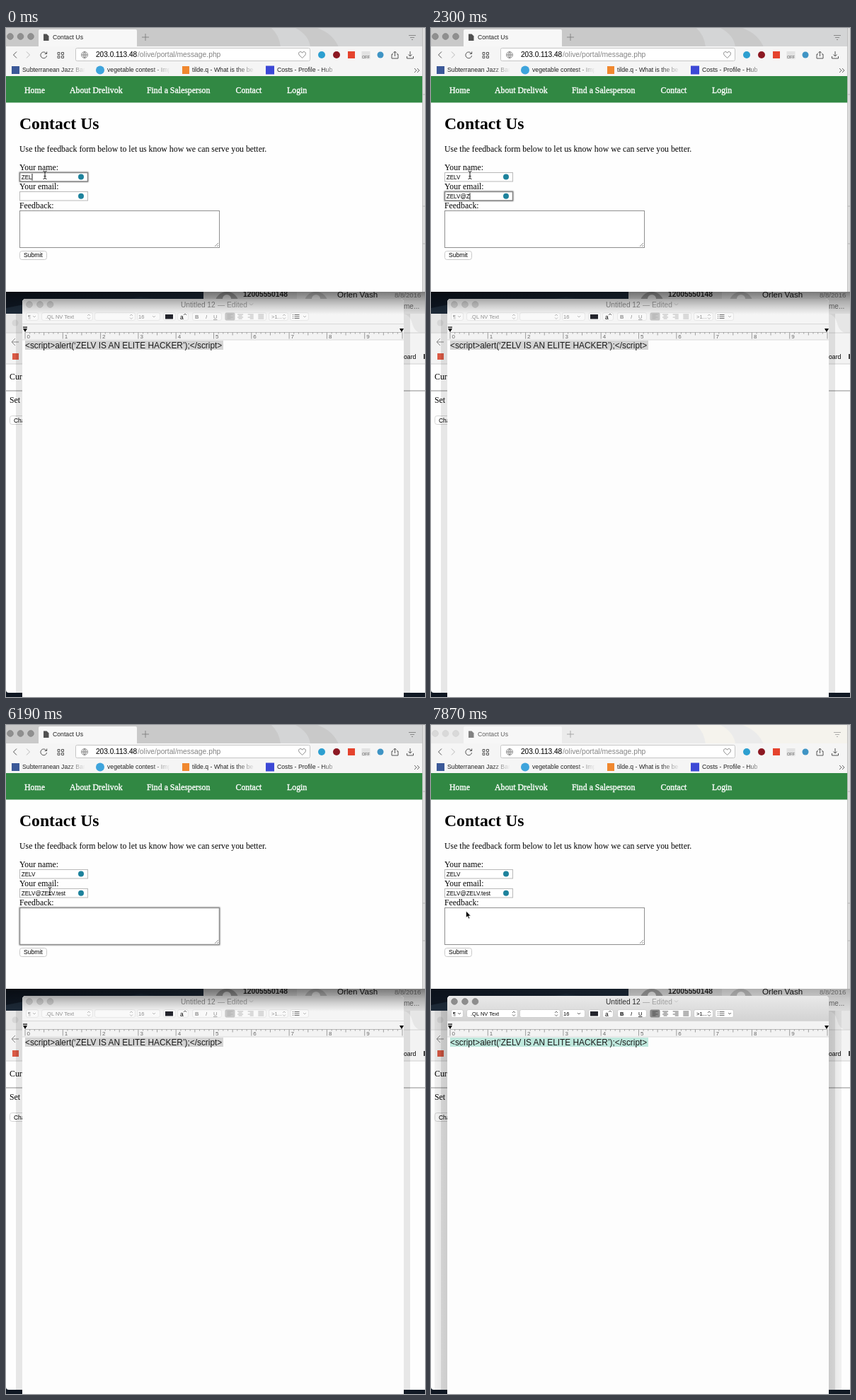
Recreate the animation shown at these times as an HTML page. Size 592x946 px, loop 8 s.

```html
<!DOCTYPE html>
<html lang="en">
<head>
<meta charset="utf-8">
<title>Contact form</title>
<style>
html, body { margin: 0; width: 100%; height: 100%; overflow: hidden; background: #fff; }
svg { display: block; width: 100vw; height: 100vh; font: 8.7px "Liberation Sans", Arial, sans-serif; }
text { white-space: pre; }
.serif { font-family: "Liberation Serif", "Times New Roman", serif; font-size: 11.84px; }
.lato { font-family: Lato, sans-serif; }
.line, .thin { fill: none; stroke: #555; }
.thin { stroke: #777; stroke-width: .8; }
.dark { stroke: #444; }
.mid { stroke: #888; }
.pale { stroke: #b9b9b9; }
.teal { stroke: #0e7f97; }
.field { fill: #fff; stroke: #b9b9b9; }
.field.on { stroke: #858585; stroke-width: 1.5; filter: drop-shadow(0 0 1px #888); }
.typed { font-size: 8.14px; }
.ctl { fill: #fff; stroke: #c9c9c9; stroke-width: .8; }

/* back: browser active, front: editor raised, active: editor focused */
#tabs { fill: #c9c9c9; }
#arcs { fill: #d4d5d6; }
#lights { fill: #8f8f8f; stroke: #7d7d7d; stroke-width: .6; }
#edBar { fill: #f5f5f5; }
#edLights { fill: #d4d4d4; stroke: #c2c2c2; stroke-width: .6; }
#edTitle { fill: #8c8c8c; }
#tools { opacity: .42; }
#sel { fill: #d4d4d4; }
#edShade { opacity: 0; }
.back #edShade { opacity: 1; }
#glow { opacity: 0; }
.active #tabs { fill: #ebebeb; }
.active #arcs { fill: #f5f3ed; }
.active #lights { fill: #d9d9d9; stroke: #cfcfcf; }
.active #tabText { opacity: .7; }
.active #edBar { fill: url(#barGrad); }
.active #edLights { fill: #8d8d8d; stroke: #7c7c7c; }
.active #edTitle { fill: #2c2c2c; }
.active #tools { opacity: 1; }
.active #sel { fill: #bfe8dd; }
.active #glow { opacity: 1; }
.front #drop { opacity: .75; }
.active #drop { opacity: .45; }
</style>
</head>
<body>
<svg id="stage" class="back" viewBox="0 0 592 946" preserveAspectRatio="none">
<defs>
  <linearGradient id="barGrad" x2="0" y2="1"><stop stop-color="#e9e9e9"/><stop offset="1" stop-color="#d3d3d3"/></linearGradient>
  <linearGradient id="down" x2="0" y2="1"><stop stop-opacity=".45"/><stop offset=".45" stop-opacity=".2"/><stop offset="1" stop-opacity="0"/></linearGradient>
  <linearGradient id="shade" x2="0" y2="1"><stop stop-opacity=".32"/><stop offset=".5" stop-opacity=".14"/><stop offset="1" stop-opacity="0"/></linearGradient>
  <linearGradient id="left"><stop stop-opacity=".05"/><stop offset="1" stop-opacity=".12"/></linearGradient>
  <linearGradient id="right"><stop stop-opacity=".12"/><stop offset="1" stop-opacity=".05"/></linearGradient>
  <linearGradient id="fade"><stop stop-color="#f5f5f5" stop-opacity="0"/><stop offset="1" stop-color="#f5f5f5"/></linearGradient>
  <linearGradient id="night"><stop stop-color="#0e1621"/><stop offset=".5" stop-color="#1c2836"/><stop offset="1" stop-color="#101823"/></linearGradient>
</defs>

<!-- desktop -->
<rect width="592" height="946" fill="url(#night)"/>
<path d="M0 396L60 384 120 394 190 380 279 392V404H0Z" fill="#1d2a38"/>

<!-- message list -->
<rect x="279" y="366" width="313" height="40" fill="#dcdcdc"/>
<rect x="279" y="366" width="132" height="17" fill="#cfcfcf"/>
<circle cx="312" cy="390" r="17" fill="#969696"/>
<circle cx="438" cy="390" r="17" fill="#b9b9b9"/>
<circle cx="312" cy="383" r="6" fill="#dedede"/>
<circle cx="438" cy="383" r="6" fill="#e9e9e9"/>
<text x="335" y="380" font-size="10.3" font-weight="bold" fill="#222">12005550148</text>
<text x="468" y="381" font-size="11.6" fill="#111">Orlen Vash</text>
<text x="549" y="381" font-size="9.6" fill="#777">8/8/2016</text>
<text x="562" y="397" font-size="10" fill="#666">me...</text>

<!-- rear browser -->
<path d="M0 404H588Q592 404 592 408V940H4Q0 940 0 936Z" fill="#fefefe"/>
<path d="M0 404H592V431H0Z" fill="#e6e6e6"/>
<path d="M562 404Q571 406 574 418T586 431H562Z" fill="#f4f4f4"/>
<path d="M0 431H592V475H0Z" fill="#f3f3f3"/>
<path d="M0 431H592M0 475H592" stroke="#d0d0d0"/>
<circle cx="13" cy="417" r="4.5" fill="#d6d6d6"/>
<path class="line mid" d="M18 444H8M13 439L8 444 13 449"/>
<rect x="9" y="460" width="9" height="9" fill="#db5a45"/>
<text x="562" y="467.5">oard</text>
<path d="M590 461h2v7h-2z" fill="#444"/>
<g class="serif"><text x="5" y="497">Cur</text><text x="5" y="530">Set</text></g>
<path d="M0 513H592" stroke="#8c8c8c"/>
<rect class="ctl" x="5.5" y="548.5" width="40" height="12" rx="3"/>
<text x="11" y="557.5" font-size="8.4">Cha</text>
<rect id="drop" x="0" y="373" width="592" height="32" fill="url(#down)"/>

<!-- editor shadow -->
<path d="M14 404H23V940H14ZM562 404H571V940H562Z" opacity=".09"/>
<g id="glow">
  <path d="M5 404H23V940H5Z" fill="url(#left)"/>
  <path d="M562 404H580V940H562Z" fill="url(#right)"/>
</g>

<!-- editor -->
<path d="M23 946V388Q23 383 28 383H557Q562 383 562 388V946Z" fill="#fdfdfd"/>
<path id="edBar" d="M23 418V388Q23 383 28 383H557Q562 383 562 388V418Z"/>
<g id="edLights"><circle cx="33" cy="391" r="4.4"/><circle cx="48" cy="391" r="4.4"/><circle cx="62.5" cy="391" r="4.4"/></g>
<g font-size="10.2">
  <text id="edTitle" x="247" y="394.5">Untitled 12</text>
  <text x="299" y="394.5" fill="#a0a0a0">— Edited</text>
</g>
<path class="thin pale" d="M344 389.5l2.5 2.5 2.5-2.5"/>
<g id="tools" font-size="7.5">
  <g id="boxes"></g>
  <text x="31" y="411">¶</text>
  <text x="56" y="410.800">.QL NV Text</text>
  <text x="187" y="410.800">16</text>
  <text x="267" y="411" font-weight="bold">B</text>
  <text x="282" y="411" font-style="italic">I</text>
  <text x="293" y="411" text-decoration="underline">U</text>
  <rect x="309.5" y="402.5" width="14" height="11" rx="2" fill="#8a8a8a"/>
  <path id="aligns" class="thin dark"/>
  <text x="375" y="410.8">&gt;1...</text>
  <path id="steppers" class="thin dark"/>
  <path class="thin dark" d="M38 407l2 2 2-2M207 407l2 2 2-2M420 407l2 2 2-2"/>
</g>
<rect x="225" y="405" width="11" height="6.5" fill="#22232b"/>
<text x="246" y="411.5" font-size="8.5">a</text>
<path class="thin dark" d="M251 406l2-2 2 2M405 405.5h1M407.5 405.5h7M405 408h1M407.5 408h7M405 410.5h1M407.5 410.5h7"/>
<rect x="23" y="418" width="539" height="23" fill="#f3f3f3"/>
<path d="M23 418.5H562M23 441H562" stroke="#d2d2d2" stroke-width=".8"/>
<path d="M27 430.5H560" stroke="#a9a9a9" stroke-width=".8"/>
<path id="ticks" class="thin mid"/>
<g id="inches" font-size="8" fill="#666"></g>
<path d="M24 425h6l-3 5zM24 422.5h6v1.3h-6zM556 425h6l-3 5z"/>
<rect id="sel" x="27" y="442" width="280" height="13"/>
<text x="27" y="452.5" font-size="11.85" fill="#1c1c1c">&lt;script&gt;alert(‘ZELV IS AN ELITE HACKER’);&lt;/script&gt;</text>
<path id="edShade" d="M23 405V388Q23 383 28 383H557Q562 383 562 388V405Z" fill="url(#shade)"/>

<!-- browser -->
<rect x="588" width="4" height="373" fill="#dcdcdc"/>
<path d="M589 94h3M589 252h3M589 305h3" stroke="#b5b5b5"/>
<rect width="588.5" height="373" fill="#fefefe"/>
<rect id="tabs" width="588.5" height="27"/>
<path id="arcs" d="M375 0H409Q428 10 430 27H388Q386 10 375 0ZM440 0H588V27H470Q462 8 440 0Z"/>
<g id="lights"><circle cx="6" cy="12" r="4.4"/><circle cx="20.5" cy="12" r="4.4"/><circle cx="35" cy="12" r="4.4"/></g>
<path d="M46 27V4Q46 2 48 2H183Q185 2 185 4V27Z" fill="#f7f7f7"/>
<g id="tabText">
  <path d="M53 8.5h4.5l3 3V18H53z" fill="#505050"/>
  <text x="66" y="16.3" fill="#222">Contact Us</text>
  <path class="thin" d="M192 13h10M197 8v10M569 10.5h10M571 13.5h6M573 16.5h2"/>
</g>
<rect y="26" width="588.5" height="42" fill="#f5f5f5"/>
<path class="line" d="M15 33.5L10.5 38 15 42.5M57 36a4.4 4.4 0 1 0 .6 3.2M57.7 33.5v3h-3"/>
<path class="line pale" d="M29 33.5L33.5 38 29 42.5"/>
<path class="line" d="M73 34.5h3v3h-3zM78.5 34.5h3v3h-3zM73 39.5h3v3h-3zM78.5 39.5h3v3h-3z"/>
<rect x="98.5" y="28.5" width="331" height="18" rx="2" fill="#fff" stroke="#c6c6c6"/>
<path class="thin" d="M106.5 38a4.5 4.5 0 1 0 9 0a4.5 4.5 0 1 0-9 0h9M111 33.5v9M111 33.5q-4.5 4.5 0 9q4.5-4.5 0-9"/>
<text x="127" y="41.3" font-size="10.1" fill="#111" stroke="#111" stroke-width=".12">203.0.113.48</text>
<text x="186" y="41.3" font-size="10.3" fill="#858585">/olive/portal/message.php</text>
<path class="thin" d="M418.5 42.5l-4.5-4.5q-1.5-4 2-4.5 2 0 2.5 1.8 .5-1.8 2.5-1.8 3.5 .5 2 4.5z"/>
<circle cx="446" cy="38" r="5" fill="#2d9fd0"/>
<circle cx="467" cy="38" r="5" fill="#8c1822"/>
<rect x="483" y="33" width="10" height="10" fill="#e5432d"/>
<rect x="502.5" y="33" width="12" height="11" fill="#e2e2e2"/>
<text x="503" y="43" font-size="5.5" fill="#555">OFF</text>
<circle cx="529" cy="38" r="4.5" fill="#3f94c4"/>
<path class="line" d="M547 37h-2v6h9v-6h-2M549.5 40v-7M547 35.5l2.5-2.5 2.5 2.5M566.5 40v3h9v-3M571 33v7M568.5 37.5l2.5 2.5 2.5-2.5"/>
<rect x="8" y="54" width="11" height="11" fill="#3b5998"/>
<circle cx="133" cy="59.5" r="6" fill="#3ea4dc"/>
<rect x="249" y="54" width="10" height="11" fill="#f0882f"/>
<rect x="367" y="53.5" width="12" height="12" fill="#3c48d6"/>
<g id="marks" fill="#222"></g>
<path class="thin dark" d="M577 57l3 3-3 3M581 57l3 3-3 3"/>
<rect y="68" width="588.5" height="37.5" fill="#318843"/>
<path d="M588.5 0V373" stroke="#b8b8b8" stroke-width=".8"/>

<!-- contact page -->
<g class="serif">
  <g fill="#fff" stroke="#fff" stroke-width=".35">
    <text x="26" y="92">Home</text><text x="90" y="92">About Drelivok</text>
    <text x="199" y="92">Find a Salesperson</text><text x="324.5" y="92">Contact</text><text x="397" y="92">Login</text>
  </g>
  <text x="19" y="143" font-size="23.7" font-weight="bold">Contact Us</text>
  <text x="19" y="175.3">Use the feedback form below to let us know how we can serve you better.</text>
  <text x="19" y="200.8">Your name:</text>
  <text x="19" y="228">Your email:</text>
  <text x="19" y="255.3">Feedback:</text>
</g>
<rect class="field" id="nameBox" x="19.5" y="204.5" width="96" height="12.5"/>
<rect class="field" id="mailBox" x="19.5" y="231.5" width="96" height="12.5"/>
<rect class="field" id="noteBox" x="19.5" y="258.5" width="282" height="52" style="stroke:#8f8f8f"/>
<path class="thin" d="M295 309l5-5M298 309l2-2"/>
<circle cx="106" cy="210.5" r="4" fill="#1d829c"/>
<circle cx="106" cy="237.8" r="4" fill="#1d829c"/>
<text class="typed" id="name" x="21.7" y="213.8"/>
<text class="typed" id="mail" x="21.7" y="241"/>
<rect id="caret" width=".9" height="9.5"/>
<rect class="ctl" x="19.5" y="315.5" width="38" height="12" rx="3" style="stroke:#bdbdbd"/>
<text x="25" y="324.3" font-size="8.6">Submit</text>

<!-- suggestion popup -->
<g id="popup" class="lato">
  <rect x="19" y="250" width="222.5" height="79.5" fill="#fff" style="filter:drop-shadow(0 1px 2px #0004)"/>
  <rect x="19" y="250" width="222.5" height="2" fill="#0e7f97"/>
  <text x="31" y="271.5" font-size="10.4" fill="#333">Email</text>
  <path class="thin" d="M220.5 263.5l9 9M229.5 263.5l-9 9"/>
  <path class="line teal" d="M32.5 297.5h14.5v10.5H32.5zl7.25 6 7.25-6M32.5 308l5-5M47 308l-5-5"/>
  <text x="56" y="300.5" font-size="10.6" fill="#8a8a8a">Email 1</text>
  <text x="56" y="314.5" font-size="10" font-weight="bold" fill="#0e7f97">tomber.zelv.47@quav.test</text>
</g>

<!-- pointers -->
<path id="beam" fill="none" stroke="#222" d="M-2.5-5.5Q0-5.5 0-4V4Q0 5.5-2.5 5.5M2.5-5.5Q0-5.5 0-4M0 4Q0 5.5 2.5 5.5M-1.5 1.5h3"/>
<path id="arrow" stroke="#fff" stroke-width=".7" d="M0 0V9.5L2.2 7.5 3.7 11 5.3 10.3 3.8 7H6.8Z"/>
</svg>

<script>
const $ = id => document.getElementById(id);
const NS = 'http://www.w3.org/2000/svg';
const LOOP = 8000;

function add(parent, tag, attrs, text = '') {
  const el = document.createElementNS(NS, tag);
  for (const k in attrs) el.setAttribute(k, attrs[k]);
  el.textContent = text;
  $(parent).append(el);
}

// editor toolbar
[[28, 17], [50, 72], [125, 57], [185, 32], [222, 17], [242, 15], [263, 41], [309, 58], [371, 27], [401, 26]]
  .forEach(([x, width]) => add('boxes', 'rect', { class: 'ctl', x: x + .5, y: 402.5, width, height: 11, rx: 2.5 }));
const indent = [0, 1.5, 3, 0];
let d = '';
for (let i = 0; i < 4; i++)
  for (let j = 0; j < 4; j++) {
    const short = j % 2 && i < 3;
    d += `M${312.5 + i * 14.6 + (short ? indent[i] : 0)} ${405 + j * 2}h${short ? 5 : 8}`;
  }
$('aligns').setAttribute('d', d);
$('steppers').setAttribute('d', [117, 177, 393]
  .map(x => `M${x - 2} 407l2-2 2 2M${x - 2} 409.5l2 2 2-2`).join(''));

// ruler
const inch = 53.3;
d = '';
for (let i = 0; i <= 80; i++)
  d += `M${27 + i * inch / 8} 430.5v${i % 8 ? (i % 4 ? 2 : 4) : 9}`;
$('ticks').setAttribute('d', d);
for (let i = 0; i < 10; i++) add('inches', 'text', { x: 29.5 + i * inch, y: 439 }, i);

// bookmarks
[[23, 'Subterranean Jazz Barn'], [143, 'vegetable contest - Imp'], [263, 'tilde.q - What is the be'], [383, 'Costs - Profile - Hub']]
  .forEach(([x, label]) => {
    add('marks', 'text', { x, y: 62.3, 'font-size': 8.7 }, label);
    add('marks', 'rect', { x: x + 62, y: 52, width: 27, height: 15, fill: 'url(#fade)' });
    add('marks', 'rect', { x: x + 88, y: 52, width: 14, height: 15, fill: '#f5f5f5' });
  });

// each track: [start, value...]
const address = 'ZELV@ZELV.test';
const tracks = {
  name: [[0, 3], [150, 4]],
  mail: [[0, 0], [1550, 1], [1700, 2], [1850, 4], [2000, 5], [2300, 6], [2450, 7], [2600, 9],
    [3200, 10], [3350, 11], [3500, 12], [3650, 13], [3950, 14]],
  focus: [[0, 'name'], [660, 'mail'], [4690, 'note'], [6790, '']],
  caret: [[0, 1], [660, 0], [1550, 1], [4390, 0], [4690, 1], [5140, 0], [5590, 1], [6040, 0], [6490, 1], [6790, 0]],
  popup: [[0, 0], [960, .4], [1110, .8], [1260, 1], [1550, 0]],
  stage: [[0, 'back'], [6640, 'front'], [6790, 'active']],
  mouse: [[0, 55, 208, 'beam'], [6190, 62, 235, 'beam'], [6340, 85, 325, 'arrow'], [6490, 110, 405, 'arrow'],
    [6640, 130, 459, 'beam'], [6790, 220, 465, 'beam'], [6940, 388, 456, 'beam'], [7120, 38, 428, 'arrow'],
    [7270, 0, 0, ''], [7570, 100, 305, 'arrow'], [7720, 40, 228, 'arrow'], [7870, 49.5, 263, 'arrow']]
};

function at(track, t) {
  let hit = track[0];
  for (const step of track) if (step[0] <= t) hit = step;
  return hit.slice(1);
}

function draw(t) {
  const now = {};
  for (const k in tracks) now[k] = at(tracks[k], t);
  const [focus] = now.focus;

  $('stage').setAttribute('class', now.stage[0]);
  $('name').textContent = address.slice(0, now.name[0]);
  $('mail').textContent = address.slice(0, now.mail[0]);
  for (const f of ['name', 'mail', 'note']) $(f + 'Box').classList.toggle('on', f === focus);
  $('popup').style.opacity = now.popup[0];

  const typed = focus === 'name' || focus === 'mail' ? $(focus) : null;
  const end = typed && typed.textContent ? typed.getComputedTextLength() : 0;
  $('caret').setAttribute('x', 21.6 + end);
  $('caret').setAttribute('y', { name: 206, mail: 233.3 }[focus] || 260.5);
  $('caret').style.opacity = now.caret[0];

  const [x, y, shape] = now.mouse;
  for (const p of ['beam', 'arrow']) {
    $(p).setAttribute('transform', `translate(${x} ${y})`);
    $(p).style.opacity = p === shape ? 1 : 0;
  }
}

function tick() {
  draw(performance.now() % LOOP);
  requestAnimationFrame(tick);
}
tick();
</script>
</body>
</html>
```
